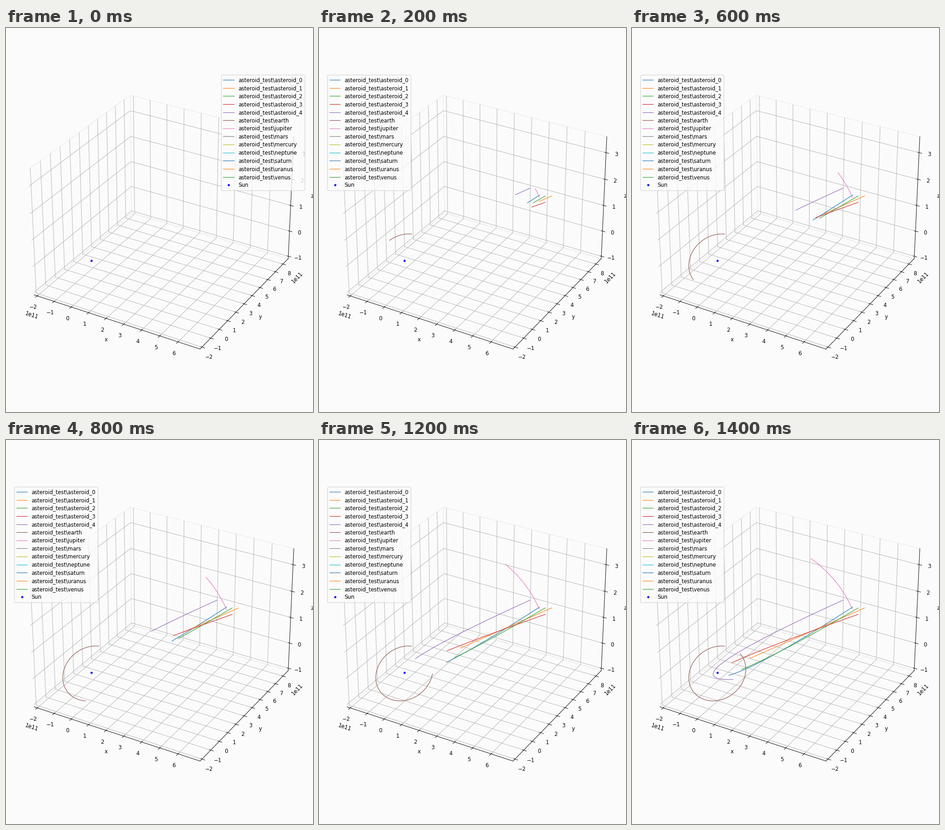
Animation, 669 px wide and 837 px high, one loop 1.5 s. Source, as a matplotlib script:

```python
import numpy as np
import matplotlib.pyplot as plt
from matplotlib.animation import FuncAnimation
from matplotlib.lines import Line2D
from matplotlib.transforms import IdentityTransform

W, H = 669, 837
DPI = W / 8
FRAMES, INTERVAL = 15, 100
DAYS_PER_FRAME = 350 / FRAMES
SCALE = 1e11
AU = 1.49598 * SCALE
TILT = np.radians(23.44)
BG = "#fbfbfb"
SUN = np.array([185.8, 507.4])  # stage pixels from the top left

PLANETS = ["earth", "jupiter", "mars", "mercury",
           "neptune", "saturn", "uranus", "venus"]

# a (AU), e, inclination, node, perihelion, mean longitude, degrees per day
ELEMENTS = {
    "earth": (1.0, 0.0167, 0, 0, 102.94, 100.31, 0.985609),
    "jupiter": (5.2029, 0.04839, 1.304, 100.474, 14.728, 42.77, 0.083091),
}

# Falling bodies: first point, last point, time of perihelion, pace
FALLS = [
    ((481, 364), (211, 513), 14.56, 4),
    ((507, 366), (257, 476), 15.95, 4),
    ((493, 366), (239, 500), 15.2, 4),
    ((493, 380), (218, 485.5), 14.9, 4),
    ((460, 349), (220, 522), 12.85, 5),
]


def orbit(a, e, inc, node, peri, mean_lon, rate, days):
    """Equatorial position in metres on a Kepler ellipse."""
    m = np.radians(mean_lon + rate * days - peri)
    ecc = m
    for _ in range(8):
        ecc = m + e * np.sin(ecc)
    px = a * AU * (np.cos(ecc) - e)
    py = a * AU * np.sqrt(1 - e * e) * np.sin(ecc)
    inc, node, arg = np.radians([inc, node, peri - node])
    u = px * np.cos(arg) - py * np.sin(arg)
    v = px * np.sin(arg) + py * np.cos(arg)
    x = u * np.cos(node) - v * np.cos(inc) * np.sin(node)
    y = u * np.sin(node) + v * np.cos(inc) * np.cos(node)
    z = v * np.sin(inc)
    return (x, y * np.cos(TILT) - z * np.sin(TILT),
            y * np.sin(TILT) + z * np.cos(TILT))


def parabola_basis(t, perihelion, pace):
    """Barker's equation: coordinates along and across the orbit's axis."""
    d = 2 * np.sinh(np.arcsinh(1.5 * pace * (t - perihelion)) / 3)
    return np.column_stack([1 - d * d, d])


def fall(first, last, perihelion, pace, t):
    """Projected parabolic orbit through two stage points."""
    ends = parabola_basis(np.array([0, FRAMES - 1]), perihelion, pace)
    axes = np.linalg.solve(ends, np.array([first, last]) - SUN)
    return SUN + parabola_basis(t, perihelion, pace) @ axes


# The tiny surplus keeps the pixel height from rounding down
fig = plt.figure(figsize=(W / DPI, (H + 1e-6) / DPI), dpi=DPI, facecolor=BG)
fig.subplots_adjust(left=0.01875, right=0.98125, bottom=0.015, top=0.985)
ax = fig.add_subplot(projection="3d", facecolor=BG)


def style(k, name):
    return dict(color=f"C{k % 10}", lw=1, label=rf"asteroid_test\{name}")


asteroids = [
    ax.add_line(Line2D([], [], transform=IdentityTransform(),
                       **style(k, f"asteroid_{k}")))
    for k in range(len(FALLS))]
planets = {
    name: ax.plot([], [], [], **style(k, name))[0]
    for k, name in enumerate(PLANETS, len(FALLS))}
sun, = ax.plot([0], [0], [0], "b.", label="Sun")


def setup_axis(axis, set_lim, low, high, last_tick):
    pad = (high - low) / 48
    axis.set_ticks(SCALE * np.arange(low, last_tick + 1))
    set_lim((low - pad) * SCALE, (high + pad) * SCALE)
    axis.pane.set_facecolor("none")
    axis.pane.set_edgecolor("0.92")
    axis.pane.set_alpha(1)


setup_axis(ax.xaxis, ax.set_xlim, -2, 7, 6)
setup_axis(ax.yaxis, ax.set_ylim, -2, 8.5, 8)
setup_axis(ax.zaxis, ax.set_zlim, -1, 3.5, 3)
ax.set_xlabel("x")
ax.set_ylabel("y")
ax.set_zlabel("z")
legend = ax.legend(handles=[*asteroids, *planets.values(), sun],
                   loc="upper right", labelspacing=0.4, facecolor=BG)


def draw(i):
    t = np.linspace(0, i, 40 * i + 1) if i else np.array([])
    for name, elements in ELEMENTS.items():
        planets[name].set_data_3d(*orbit(*elements, t * DAYS_PER_FRAME))
    for line, params in zip(asteroids, FALLS):
        x, y = fall(*params, t).T
        line.set_data(x, H - y)
    legend.set_loc("upper right" if i < 2 else "upper left")
    return [*asteroids, *planets.values(), legend]


anim = FuncAnimation(fig, draw, frames=FRAMES, interval=INTERVAL,
                     init_func=lambda: draw(0), repeat=True)
plt.show()
```
